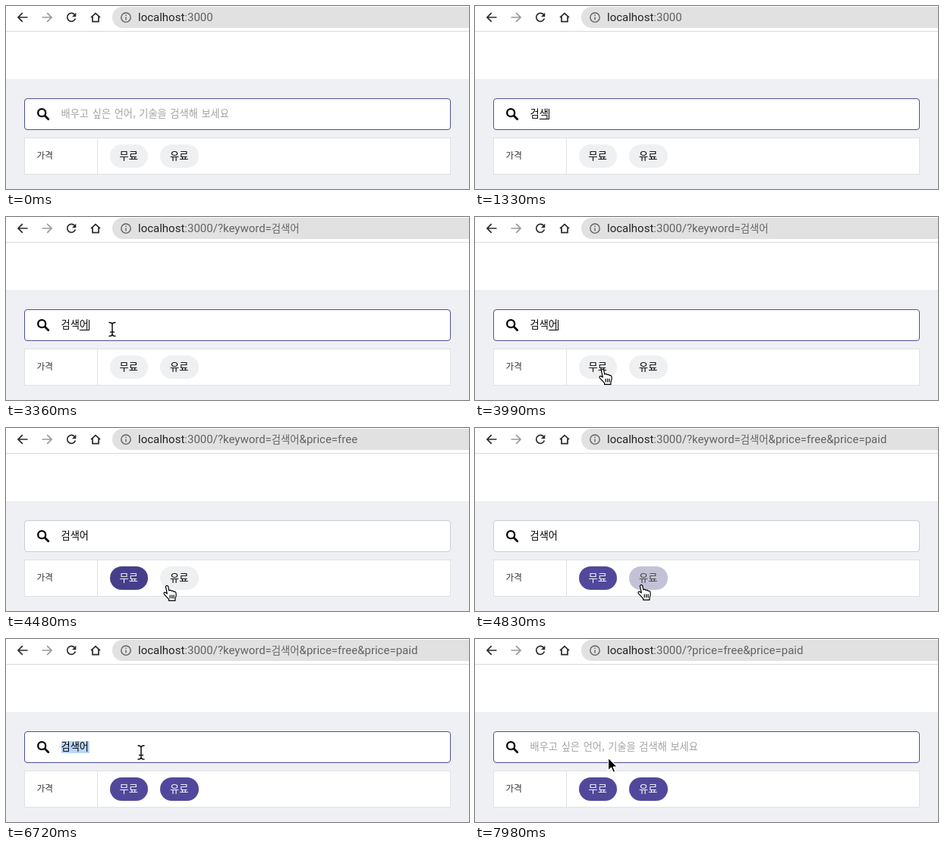
An HTML page for the animation above (8 s loop, 610x242 px).

```html
<!DOCTYPE html>
<html lang="ko">
<head>
<meta charset="utf-8">
<title>Search filter</title>
<style>
html, body { margin: 0; width: 100%; height: 100%; overflow: hidden; background: #fff; }
svg { display: block; width: 610px; height: 242px; }
text { font: 13.2px "Noto Sans CJK KR", "Noto Sans CJK", sans-serif; white-space: pre; }
#url { font: 15px Roboto, Arial, sans-serif; fill: #616366; }
#url .host { fill: #232427; }
#url .ko { font: 13.3px "Noto Sans CJK KR", "Noto Sans CJK", sans-serif; }
#hint { fill: #a3a3a3; word-spacing: 1px; }
#label { font-size: 11.6px; font-weight: 500; fill: #333; }
.icon { fill: none; stroke: #2b2b2b; stroke-width: 1.7; }
.pointer { stroke-linejoin: round; stroke-linecap: round; }
</style>
</head>
<body>
<svg viewBox="0 0 610 242">
  <rect width="610" height="242" fill="#fff"/>
  <rect x="140" y="1" width="490" height="28" rx="14" fill="#e1e1e1"/>
  <rect y="33" width="610" height="1" fill="#d9d9d9"/>
  <rect y="97" width="610" height="145" fill="#eff0f3"/>
  <rect y="97" width="610" height="1" fill="#e9eaed"/>

  <g class="icon">
    <path d="M28.5 15H16M21.8 9.2L16 15L21.8 20.8"/>
    <path d="M47.5 15H60M54.2 9.2L60 15L54.2 20.8" stroke="#9a9a9a" style="stroke:#9a9a9a"/>
    <path d="M90.3 11.2A5.5 5.5 0 1 0 91.4 16.6"/>
    <path d="M92.3 8.8V14.2H86.9Z" fill="#2b2b2b" stroke="none" style="stroke:none"/>
    <path d="M112 15.2L118 9.6L124 15.2M114 14V20.6H122V14"/>
    <g style="stroke:#606266;stroke-width:1.4">
      <circle cx="158" cy="15.2" r="6.2"/>
      <path d="M158 14.4V18.6M158 11.6V13"/>
    </g>
  </g>
  <text id="url" x="174" y="20"><tspan class="host">localhost</tspan><tspan>:3000</tspan><tspan id="head"></tspan><tspan id="word" class="ko"></tspan><tspan id="tail"></tspan></text>

  <rect id="box" x="24.5" y="122.5" width="561" height="41" rx="3.5" fill="#fff"/>
  <g fill="none" stroke="#000" stroke-linecap="round">
    <circle cx="47.2" cy="141.2" r="5" stroke-width="2.3"/>
    <path d="M51.3 145.3L55.8 149.8" stroke-width="2.7"/>
  </g>
  <rect id="mark" x="73" y="135" width="37" height="16" fill="#b8d6fb"/>
  <text id="hint" x="72.6" y="147.3">배우고 싶은 언어, 기술을 검색해 보세요</text>
  <text id="typed" x="72.6" y="147.3"></text>
  <rect id="line" y="149" width="12" height="1"/>
  <rect id="caret" y="136" width="1" height="14"/>

  <rect x="24.5" y="174.5" width="561" height="48" fill="#fff" stroke="#dfe0e2"/>
  <path d="M120.5 174V223" stroke="#dfe0e2"/>
  <text id="label" x="40.6" y="201.6">가격</text>
  <rect id="free" x="137" y="183" width="50" height="31" rx="15.5"/>
  <text id="freeText" x="149.6" y="202.6">무료</text>
  <rect id="paid" x="203" y="183" width="51" height="31" rx="15.5"/>
  <text id="paidText" x="216" y="202.6">유료</text>

  <g id="beam" class="pointer" fill="none">
    <path id="beamShape" stroke="#fff" stroke-width="3.2" d="M-4-9Q0-9 0-6.2Q0-9 4-9M0-7V7M-4 9Q0 9 0 6.2Q0 9 4 9M-2.6 3.6H2.6"/>
    <use id="beamInk" href="#beamShape"/>
    <path stroke="#000" stroke-width="1.4" d="M-4-9Q0-9 0-6.2Q0-9 4-9M0-7V7M-4 9Q0 9 0 6.2Q0 9 4 9M-2.6 3.6H2.6"/>
  </g>
  <g id="hand" class="pointer" stroke="#000" stroke-width="1.2">
    <path fill="#fff" d="M-1.7 1.7Q0-1 1.8 1.7L2.7 7Q5 5.6 5.9 7.6Q8.2 6.6 9 8.6Q11.7 7.8 12.1 10.6Q12.7 14.5 10.9 17.5V20.4H2.6V18.6Q0 15.5-3.7 11.8Q-4.8 9.2-2 9.4L.3 11Z"/>
    <path fill="none" d="M4.2 13V17M6.7 13V17M9.1 13V17"/>
  </g>
  <path id="arrow" class="pointer" fill="#000" stroke="#fff" stroke-width="1.2" d="M0 0V17L4 13.2L6.6 19.3L9.3 18.2L6.7 12.2H12Z"/>
</svg>
<script>
const LOOP = 8000, TICK = 70;
const $ = id => document.getElementById(id);
const OFF = [239, 240, 242], ON = [82, 72, 155], DARK = [67, 58, 134];
const FOCUS = [78, 78, 146], IDLE = [200, 204, 210];
const BLACK = [0, 0, 0], WHITE = [255, 255, 255];

// Stepped values: [start, value]
const typed = [[0, ''], [910, 'ㄱ'], [980, '거'], [1050, '검'], [1190, '검ㅅ'], [1260, '검새'],
  [1330, '검색'], [1610, '검색ㅇ'], [1890, '검색어'], [6930, '']];
const url = [[0, ['', '', '']], [2170, ['/?keyword=', '검색어', '']],
  [4200, ['/?keyword=', '검색어', '&price=free']],
  [4830, ['/?keyword=', '검색어', '&price=free&price=paid']],
  [7350, ['/?price=free&price=paid', '', '']]];
const caret = [[0, 0], [490, 1], [2380, 0], [2940, 1], [3430, 0], [3920, 1], [4130, 0],
  [6020, 1], [6510, 0], [7000, 1], [7560, 0]];
const shown = [[0, 0], [3360, 1], [6930, 0], [7980, 1]];

// Eased values: [time, vector]
const border = [[4060, FOCUS], [4200, IDLE], [5880, IDLE], [6020, FOCUS]];
const free = [[4130, OFF], [4340, DARK], [4410, DARK], [4620, ON]];
const paid = [[4760, OFF], [4970, DARK], [5600, DARK], [5740, ON]];
const freeInk = [[4130, BLACK], [4340, WHITE]];
const paidInk = [[4760, BLACK], [4970, WHITE]];
const path = [[3360, [140, 148.5]], [3990, [168, 201]], [4200, [168, 201]], [4480, [212, 208]],
  [4690, [219, 207]], [5530, [219, 207]], [5810, [178, 150]], [7910, [178, 150]], [7980, [175.5, 157]]];

const step = (rows, t) => rows.reduce((v, r) => r[0] <= t ? r[1] : v, rows[0][1]);

function ease(rows, t) {
  const i = rows.findIndex(r => r[0] > t);
  if (i === 0) return rows[0][1];
  if (i < 0) return rows[rows.length - 1][1];
  const [t0, a] = rows[i - 1], [t1, b] = rows[i];
  const p = (t - t0) / (t1 - t0), k = p * p * (3 - 2 * p);
  return a.map((v, n) => v + (b[n] - v) * k);
}

const rgb = v => `rgb(${v.map(Math.round)})`;
const show = (id, on) => $(id).setAttribute('visibility', on ? 'visible' : 'hidden');
const paint = (id, rows, t, attr = 'fill') => $(id).setAttribute(attr, rgb(ease(rows, t)));

function draw(time) {
  const t = Math.floor(time / TICK) * TICK;
  const word = step(typed, t);
  const end = 73 + 12 * word.length;
  const composing = word && t < 4130;

  $('typed').textContent = word;
  show('hint', !word);
  show('line', composing);
  $('line').setAttribute('x', end - 12);
  show('caret', step(caret, t));
  $('caret').setAttribute('x', end);
  show('mark', t >= 6720 && t < 6930);

  const parts = step(url, t);
  ['head', 'word', 'tail'].forEach((id, i) => $(id).textContent = parts[i]);

  paint('box', border, t, 'stroke');
  paint('free', free, t);
  paint('paid', paid, t);
  paint('freeText', freeInk, t);
  paint('paidText', paidInk, t);

  const [x, y] = ease(path, t);
  const overChip = y >= 183 && y <= 214 && (x >= 137 && x <= 187 || x >= 203 && x <= 254);
  const kind = t >= 7980 ? 'arrow' : y < 164 ? 'beam' : overChip ? 'hand' : 'arrow';
  for (const id of ['beam', 'hand', 'arrow']) {
    show(id, kind === id && step(shown, t));
    $(id).setAttribute('transform', `translate(${x} ${y})`);
  }
}

const start = performance.now();
function tick(now) {
  draw(Math.max(0, now - start) % LOOP);
  requestAnimationFrame(tick);
}
draw(0);
requestAnimationFrame(tick);
</script>
</body>
</html>
```
